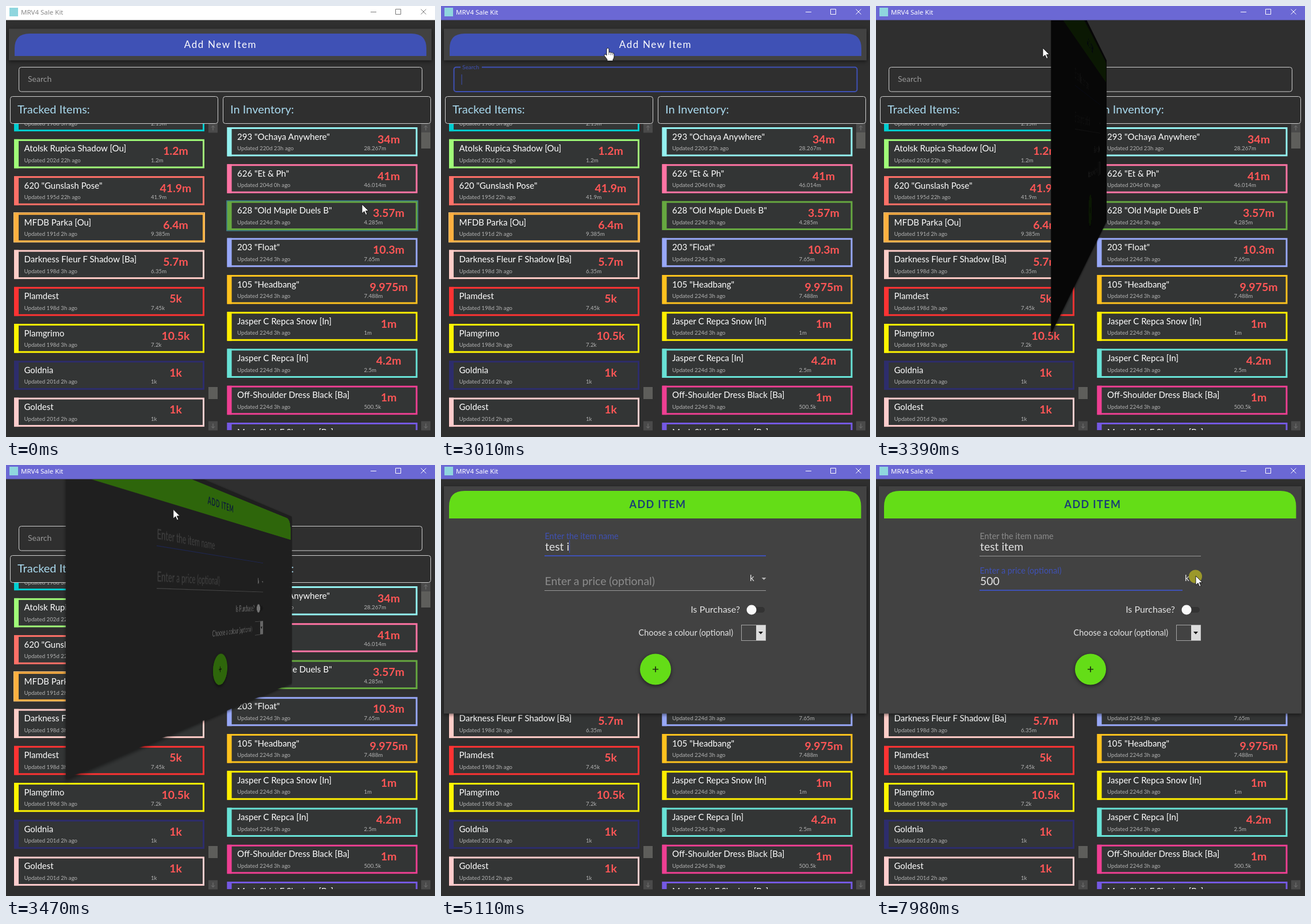
An HTML page that plays this animation: 746 by 750 pixels, repeating every 8 s.

```html
<!DOCTYPE html>
<html lang="en">
<head>
<meta charset="utf-8">
<title>Shop list</title>
<style>
html, body { margin: 0; width: 100%; height: 100%; overflow: hidden; background: #2f2f2f; }
svg { position: absolute; left: 0; top: 0; width: 746px; height: 750px; }
#deck { position: absolute; left: 0; top: 25px; width: 746px; height: 725px; overflow: hidden; }
#deck svg { top: -25px; }
#front { transform-origin: 372.5px 67px; }
#back { transform-origin: 372.5px 234.5px; }
text { font-family: Lato, "Open Sans", sans-serif; white-space: pre; }
.ui { font-family: "Noto Sans", "Open Sans", sans-serif; }
.card { fill: #424242; filter: drop-shadow(0 2px 3px rgba(0,0,0,.55)); }
</style>
</head>
<body>
<svg id="base" viewBox="0 0 746 750"></svg>
<div id="deck">
  <svg id="front" viewBox="0 0 746 750"></svg>
  <svg id="back" viewBox="0 0 746 750"></svg>
</div>
<svg id="top" viewBox="0 0 746 750"></svg>
<script>
const LOOP = 8000, BLUE = '#3f51b5', GREEN = '#64dd17';
const $ = id => document.getElementById(id);
const set = (id, attrs) => { for (const k in attrs) $(id).setAttribute(k, attrs[k]); };
const show = (id, on) => { $(id).style.display = on ? '' : 'none'; };
const clamp = v => Math.max(0, Math.min(1, v));
const ramp = (t, a, b) => clamp((t - a) / (b - a));
const mix = (a, b, p) => a + (b - a) * p;
const easeOut = (p, n = 2) => 1 - (1 - p) ** n;

const rect = (x, y, w, h, fill, more = '') =>
  `<rect x="${x}" y="${y}" width="${w}" height="${h}" fill="${fill}" ${more}/>`;
const path = (d, more) => `<path d="${d}" ${more}/>`;
const text = (x, y, size, str, fill, more = '') =>
  `<text x="${x}" y="${y}" font-size="${size}" fill="${fill}" ${more}>${str.replace('&', '&amp;')}</text>`;

// name | age | last price | price | colour
const tracked = [
  ' |198d 3h|2.15m||#00cdd0',
  'Atolsk Rupica Shadow [Ou]|202d 22h|1.2m|1.2m|#a0fc78',
  '620 "Gunslash Pose"|195d 22h|41.9m|41.9m|#ff7168',
  'MFDB Parka [Ou]|191d 2h|9.385m|6.4m|#ffb040',
  'Darkness Fleur F Shadow [Ba]|198d 3h|6.35m|5.7m|#ffcdc8',
  'Plamdest|198d 3h|7.45k|5k|#ff3333',
  'Plamgrimo|198d 3h|7.2k|10.5k|#fff500',
  'Goldnia|201d 2h|1k|1k|#2d2d6c',
  'Goldest|201d 2h|1k|1k|#ffcccc'
];
const stock = [
  '293 "Ochaya Anywhere"|220d 23h|28.267m|34m|#94f1f0',
  '626 "Et & Ph"|204d 0h|46.014m|41m|#ff74a4',
  '628 "Old Maple Duels B"|224d 3h|4.285m|3.57m|#66a840',
  '203 "Float"|224d 3h|7.65m|10.3m|#98a8f8',
  '105 "Headbang"|224d 3h|7.488m|9.975m|#ffc21e',
  'Jasper C Repca Snow [In]|224d 3h|1m|1m|#ffee00',
  'Jasper C Repca [In]|224d 3h|2.5m|4.2m|#68e2d6',
  'Off-Shoulder Dress Black [Ba]|224d 3h|500.5k|1m|#ee3f92',
  'Mask Shirt F Shadow [Ba]|224d 3h|1m||#7459e2'
];

function itemRow(row, x, y) {
  const [name, age, last, price, col] = row.split('|');
  return rect(x + 1.5, y + 1.5, 328, 47.5, '#333535', `stroke="${col}" stroke-width="3"`) +
    rect(x, y, 8, 50.5, col) +
    text(x + 17.5, y + 21.5, 15, name, '#fff') +
    text(x + 17.5, y + 40, 9.7, `Updated ${age} ago`, '#b4b4b4') +
    text(x + 238, y + 40, 9.7, last, '#b4b4b4') +
    text(x + 281, y + 27.5, 19.5, price, '#ff5656', 'font-weight="700" text-anchor="middle"');
}
const list = (rows, x, y) => rows.map((r, i) => itemRow(r, x, y + i * 64.25)).join('');

function scrollBar(x, thumbY, thumbH) {
  const arrow = (y, s) => rect(x, y, 16, 16, '#4a4a4a') +
    path(`M${x + 8} ${y + 8 + 4 * s}v${-8 * s}m-3 ${3 * s}l3 ${-3 * s}l3 ${3 * s}`, 'fill="none" stroke="#777"');
  return arrow(204.5, 1) + arrow(722.5, -1) + rect(x, thumbY, 16, thumbH, '#5e5e5b');
}
const header = (x, str) =>
  rect(x + .5, 157.5, 361, 47, '#2f2f2f', 'rx="4" stroke="#d0d0d0"') + text(x + 13, 187, 20, str, '#a9d9ee');
const roundTop = (x, y, w, h, r, fill) =>
  path(`M${x} ${y + h}V${y + r}Q${x} ${y} ${x + r} ${y}H${x + w - r}Q${x + w} ${y} ${x + w} ${y + r}V${y + h}Z`, `fill="${fill}"`);

$('base').innerHTML =
  rect(0, 0, 746, 750, '#2f2f2f') +
  `<clipPath id="lists">${rect(0, 205, 746, 533, '#000')}</clipPath>
  <g clip-path="url(#lists)">${list(tracked, 14, 167.6)}${list(stock, 384.5, 211)}
  ${rect(13.5, 359.5, 332, 51.5, 'none', 'stroke="#ffc67a"')}
  ${rect(384, 339, 332, 52, 'none', 'id="hover" stroke="#3f8690" stroke-width="1.5"')}</g>` +
  scrollBar(352, 663, 21) + scrollBar(722, 220, 28) +
  header(7, 'Tracked Items:') + header(377, 'In Inventory:') +
  rect(22.5, 106.5, 701, 42.5, 'none', 'id="box" rx="4"') +
  rect(34, 103, 37, 6, '#2f2f2f', 'id="notch"') +
  text(38, 132, 14, 'Search', '#999', 'id="hint"') +
  rect(35.5, 119, 1, 18, BLUE, 'id="caret"');

$('front').innerHTML =
  rect(5, 39.5, 735, 55, '#424242', 'class="card"') +
  roundTop(15, 48, 716, 39, 26, BLUE) +
  text(373, 73, 17, 'Add New Item', '#fff', 'text-anchor="middle" letter-spacing="1.6"');

// A form field: base line, focus line, floating label, value and caret
const field = (id, y, label) =>
  rect(180, y, 385, 1, '#9a9a9a', `id="${id}Line"`) +
  rect(180, y - 1, 0, 2, BLUE, `id="${id}Focus"`) +
  text(180.5, 0, 19.4, label, '#8c8c8c', `id="${id}Label"`) +
  text(181, y - 9.5, 19.4, '', '#e4e4e4', `id="${id}Value"`) +
  rect(181, y - 27, 1, 22, BLUE, `id="${id}Caret"`);

$('back').innerHTML =
  rect(5, 37, 735, 395.5, '#424242', 'class="card"') +
  roundTop(14, 45, 716.5, 48, 27, GREEN) +
  text(377, 75, 18, 'ADD ITEM', '#1a3f75', 'font-weight="700" text-anchor="middle" letter-spacing="1.4"') +
  field('name', 158, 'Enter the item name') +
  field('price', 218, 'Enter a price (optional)') +
  rect(533, 218, 32, 1, '#9a9a9a', 'id="unitLine"') +
  text(537, 202, 15, 'k', '#e8e8e8') +
  path('M557.5 196h8l-4 4z', 'fill="#b5b5b5"') +
  `<circle id="ripple" cx="555.5" cy="194" fill="#9b982a"/>` +
  text(520, 257, 16, 'Is Purchase?', '#e4e4e4', 'text-anchor="end"') +
  rect(536, 247, 27, 10, '#333', 'rx="5"') + '<circle cx="540" cy="252" r="8.5" fill="#fafafa"/>' +
  text(508, 297, 14.4, 'Choose a colour (optional)', '#e4e4e4', 'text-anchor="end"') +
  rect(522.5, 278.5, 42, 27, '#424242', 'stroke="#a5a5a5"') + rect(548, 279, 16.5, 26, '#dcdcdc') +
  path('M552 290h8l-4 4.5z', 'fill="#111"') +
  `<circle class="card" cx="373" cy="355.5" r="27" style="fill:${GREEN}"/>` +
  path('M368 355.5h10m-5 -5v10', 'stroke="#1d2b10" stroke-width="1.7"');

const outline = 'fill="#fff" stroke="#111" stroke-width=".9" stroke-linejoin="round"';
$('top').innerHTML =
  rect(0, 0, 746, 24.5, '#fff', 'id="bar"') + rect(6, 3, 15, 15, '#8fd6de') +
  text(26, 14.5, 11.5, 'MRV4 Sale Kit', '#888', 'id="title" class="ui"') +
  path('M634 10.5h10M677.5 5.5h9v9h-9zM721.5 5.5l9 9m0 -9l-9 9', 'id="buttons" fill="none"') +
  '<g id="pointer"><g id="arrow">' +
  path('M0 0V16L4 12.4L6.6 18.5L9 17.4L6.5 11.6H11.6Z', outline) + '</g><g id="hand">' +
  path('M-2 1.5Q0 -1.5 2 1.5V8Q4 6 5.5 8.3Q7.5 7 8.5 9Q11 8 11 11V15Q11 18 9 20V22.5H-1V20L-6 13.5Q-6.5 10.5 -4 11L-2 13Z', outline) +
  path('M2 8v4M5.5 8.5v4M8.5 9.5v3', 'stroke="#333" stroke-width=".8"') + '</g><g id="beam">' +
  path('M-3.5 -8H-1Q0 -8 0 -7Q0 -8 1 -8H3.5M0 -7V7M-3.5 8H-1Q0 8 0 7Q0 8 1 8H3.5', 'fill="none" stroke="#f2f2f2" stroke-width="1.2"') +
  '</g></g>';

// time, x, y
const route = [
  [0, 619, 345], [130, 619, 345], [540, 200, 141], [2580, 200, 141], [2930, 290, 73], [3420, 290, 73],
  [3760, 304, 143], [5850, 304, 143], [6050, 284, 198], [7460, 284, 198], [7860, 556, 193], [LOOP, 556, 193]
];
const nameKeys = [4480, 4650, 4880, 4950, 5030, 5100, 5180, 5350, 5420];
const priceKeys = [6810, 6890, 6970];
const typed = (str, keys, t) => str.slice(0, keys.filter(k => t >= k).length);

function drawPointer(t) {
  const i = route.findIndex((r, k) => k && t <= r[0]);
  const [t0, x0, y0] = route[i - 1], [t1, x1, y1] = route[i];
  let p = ramp(t, t0, t1);
  p = p * p * (3 - 2 * p);
  const x = mix(x0, x1, p), y = mix(y0, y1, p);
  const over = (a, b, c, d) => x > a && x < c && y > b && y < d;
  let kind = 'arrow';
  if (t < 3030) {
    if (over(22, 107, 723, 149)) kind = 'beam';
    else if (over(15, 48, 731, 87)) kind = 'hand';
  } else if (t > 3680 && (over(180, 131, 533, 159) || over(180, 185, 533, 219))) kind = 'beam';
  for (const k of ['arrow', 'hand', 'beam']) show(k, k === kind);
  show('pointer', !(t >= 4480 && t < 5850 || t >= 6810 && t < 7470));
  set('pointer', { transform: `translate(${x} ${y})` });
}

function drawSearch(t) {
  const focus = t >= 690 && t < 3080;
  const p = focus ? easeOut(ramp(t, 640, 850)) : 0;
  set('box', { stroke: focus ? BLUE : '#d0d0d0', 'stroke-width': focus ? 2 : 1 });
  set('hint', { x: mix(38, 37, p), y: mix(132, 110, p), 'font-size': mix(14, 10, p), fill: focus ? BLUE : '#999' });
  show('notch', p > .5);
  show('caret', focus && t >= 770 && !(t >= 1390 && t < 1940 || t >= 2390 && t < 2900));
}

function turn(id, deg, on) {
  const card = $(id), still = Math.abs(deg) < .01;
  show(id, on);
  card.style.transform = still ? 'none' : `perspective(890px) rotateY(${deg}deg)`;
  card.style.filter = still ? 'none' : `brightness(${Math.cos(deg * Math.PI / 180)})`;
}

function drawField(id, y, width, str, { raise, focus, active, hover, caret }) {
  const w = width * focus;
  set(id + 'Line', { fill: hover ? BLUE : '#9a9a9a', width });
  set(id + 'Focus', { x: 180 + (width - w) / 2, width: w });
  set(id + 'Label', { y: mix(y - 9.5, y - 29, raise), 'font-size': mix(19.4, 14.4, raise), fill: active ? BLUE : '#8c8c8c' });
  const value = $(id + 'Value');
  if (value.textContent !== str) value.textContent = str;
  show(id + 'Caret', caret);
  if (caret) set(id + 'Caret', { x: 181 + (str ? value.getComputedTextLength() : 0) });
}

function drawForm(t) {
  const a = ramp(t, 4060, 4360), b = ramp(t, 6200, 6500);
  drawField('name', 158, 385, typed('test item', nameKeys, t), {
    raise: easeOut(a), focus: b ? 1 - easeOut(b, 4) : easeOut(a, 4),
    active: a > 0 && !b, hover: t < 5950, caret: t >= 4150 && t < 5900
  });
  drawField('price', 218, 353, typed('500', priceKeys, t), {
    raise: easeOut(b), focus: easeOut(b, 4),
    active: b > 0, hover: t >= 6000 && t < 7700, caret: t >= 6270 && t < 7520
  });
  show('unitLine', t < 7800);
  set('ripple', { r: 11.5 * ramp(t, 7870, 7970) });
}

function draw(t) {
  const active = t >= 690;
  set('bar', { fill: active ? '#6b68d4' : '#fff' });
  set('title', { fill: active ? '#fff' : '#888' });
  set('buttons', { stroke: active ? '#fff' : '#777' });
  show('hover', t < 190);
  drawSearch(t);
  const angle = 180 * ramp(t, 3030, 3705);
  turn('front', -angle, angle < 90);
  turn('back', 180 - angle, angle >= 90);
  if (angle >= 90) drawForm(t);
  drawPointer(t);
}

const start = performance.now();
function tick() {
  draw((performance.now() - start) % LOOP);
  requestAnimationFrame(tick);
}
tick();
</script>
</body>
</html>
```
